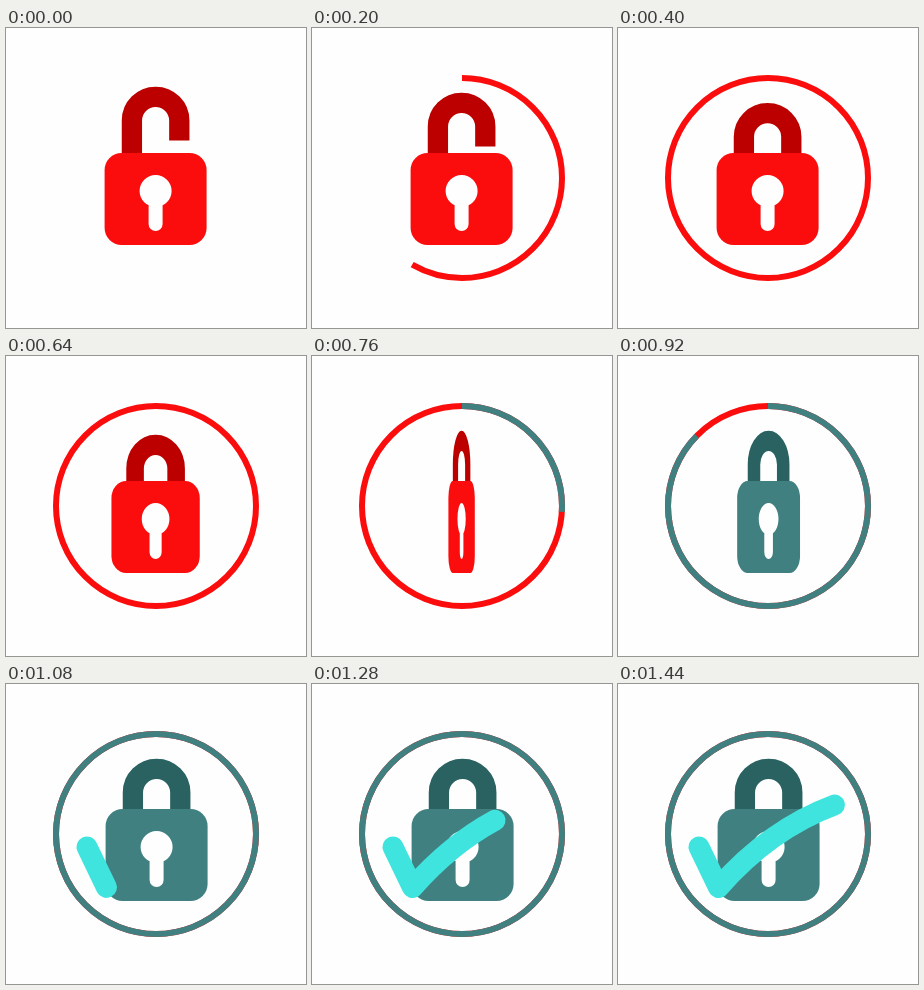
Animation of 300x300 px, one loop 1880 ms. Source, as an HTML page with a canvas:

```html
<!DOCTYPE html>
<html lang="en">
<head>
<meta charset="utf-8">
<title>Padlock closing</title>
<style>
  html, body { margin: 0; width: 100%; height: 100%; overflow: hidden; background: #fefefe; }
  canvas { display: block; }
</style>
</head>
<body>
<canvas id="stage" width="300" height="300"></canvas>
<script>
const ctx = document.getElementById('stage').getContext('2d');
const LOOP = 1880, STEP = 40;
const WHITE = '#fefefe';
const RED = { body: '#fb0d0d', shackle: '#bc0000' };
const TEAL = { body: '#408080', shackle: '#2a6262' };
const CHECK_COLOR = '#40e4de', CHECK_LENGTH = 192;

const progress = (t, from, to) => Math.min(1, Math.max(0, (t - from) / (to - from)));
const smooth = u => u * u * (3 - 2 * u);
const accelerate = u => u * u * (2 - u);

function ring(color, part) {
  if (part <= 0) return;
  ctx.beginPath();
  ctx.arc(150, 150, 100, -Math.PI / 2, -Math.PI / 2 + part * 2 * Math.PI);
  ctx.strokeStyle = color;
  ctx.lineWidth = 6;
  ctx.lineCap = 'butt';
  ctx.stroke();
}

// The lock is drawn around x = 0 so that scaling the width turns it over.
function lock(colors, centerX, width, drop) {
  if (width <= 0) return;
  ctx.save();
  ctx.translate(centerX, 0);
  ctx.scale(width, 1);

  ctx.beginPath();
  ctx.moveTo(-23.7, 130);
  ctx.lineTo(-23.7, 92.5 + drop);
  ctx.arc(0, 92.5 + drop, 23.7, Math.PI, 0);
  ctx.lineTo(23.7, 112.5 + drop);
  ctx.strokeStyle = colors.shackle;
  ctx.lineWidth = 20.3;
  ctx.lineCap = 'butt';
  ctx.stroke();

  ctx.beginPath();
  ctx.roundRect(-51, 125, 102, 92, 17);
  ctx.fillStyle = colors.body;
  ctx.fill();

  ctx.beginPath();
  ctx.arc(0, 163, 16, 0, 2 * Math.PI);
  ctx.roundRect(-7, 163, 14, 40, 7);
  ctx.fillStyle = WHITE;
  ctx.fill();
  ctx.restore();
}

function check(part) {
  if (part <= 0) return;
  ctx.save();
  ctx.beginPath();
  ctx.moveTo(81, 163);
  ctx.lineTo(100.5, 203.5);
  ctx.quadraticCurveTo(152, 145, 216.5, 121);
  ctx.setLineDash([part * CHECK_LENGTH, 999]);
  ctx.strokeStyle = CHECK_COLOR;
  ctx.lineWidth = 21;
  ctx.lineCap = ctx.lineJoin = 'round';
  ctx.stroke();
  ctx.restore();
}

function draw(t) {
  ctx.fillStyle = WHITE;
  ctx.fillRect(0, 0, 300, 300);

  ring(RED.body, smooth(progress(t, 0, 360)));
  ring(TEAL.body, smooth(progress(t, 640, 1000)));

  const drop = 20 * smooth(progress(t, 0, 550)) - 4 * smooth(progress(t, 640, 760));
  lock(RED, 149.6, 1 - accelerate(progress(t, 573, 813)), drop);
  lock(TEAL, 150.6, 1 - accelerate(1 - progress(t, 813, 1030)), 16);

  check(smooth(progress(t, 920, 1430)));
}

const start = performance.now();
function tick() {
  const t = (performance.now() - start) % LOOP;
  draw(Math.floor(t / STEP) * STEP);
  requestAnimationFrame(tick);
}
tick();
</script>
</body>
</html>
```
